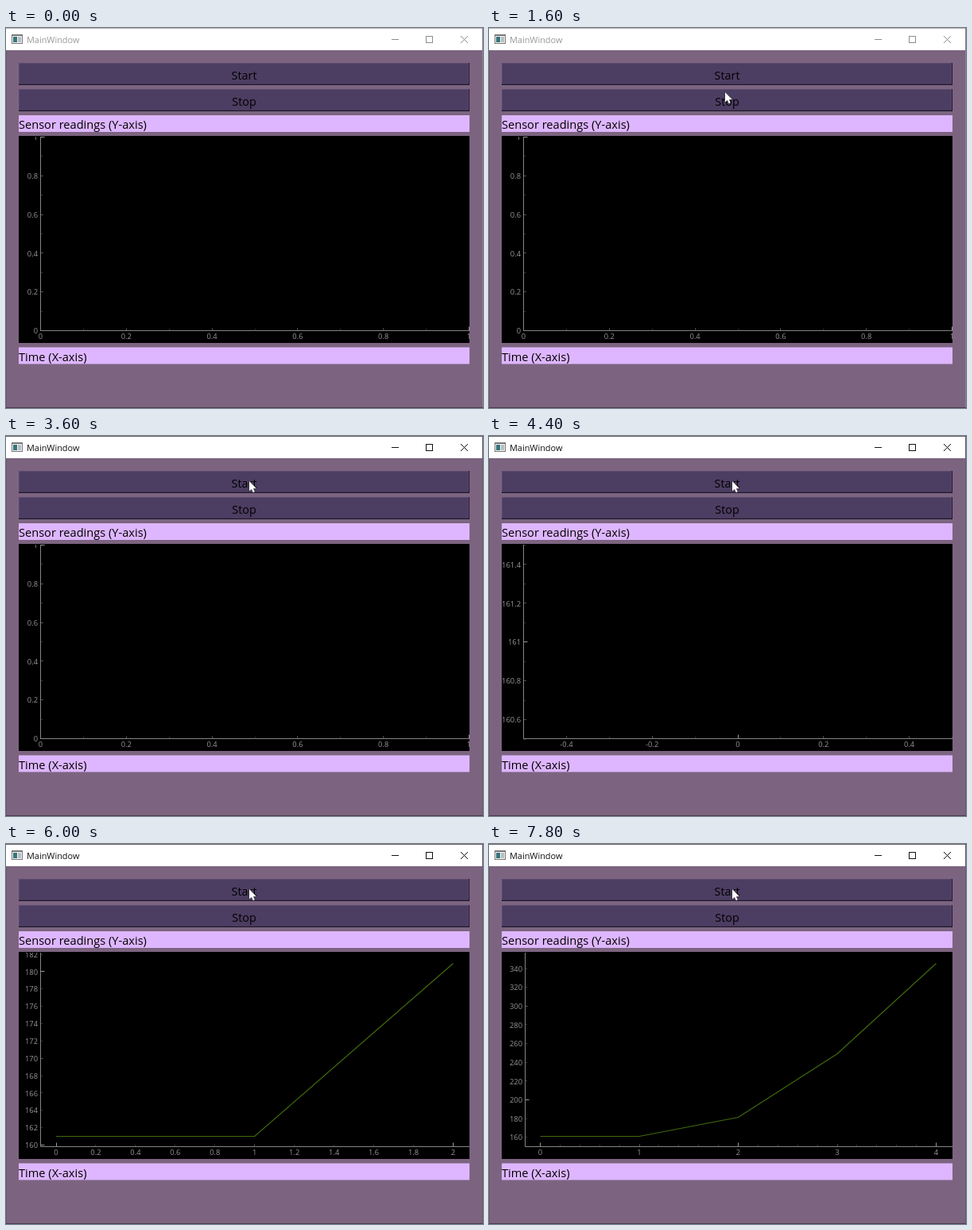
Recreate the animation shown at these times as an HTML page with a canvas. Size 600 px wide and 479 px high, loop 8 s.

```html
<!DOCTYPE html>
<html lang="en">
<head>
<meta charset="utf-8">
<title>MainWindow</title>
<style>
html, body { margin: 0; width: 100%; height: 100%; overflow: hidden; background: #7c6480; }
canvas { display: block; }
</style>
</head>
<body>
<canvas id="stage" width="600" height="479"></canvas>
<script>
const ctx = document.getElementById('stage').getContext('2d');
const LOOP = 8000, STEP = 200, ACTIVATED = 3400;
const FONT = '"Open Sans", "Noto Sans", sans-serif';
const LEFT = 16, RIGHT = 583;
const AXIS_Y = 381.5, PLOT_TOP = 137;

const readings = [161, 161, 181, 249, 346];
const arrivals = [3800, 4600, 5600, 6400, 7400];

// Per number of readings: axis position, two [value, pixel] anchors per axis,
// tick spacings from coarse to fine, and label spacing.
const views = [
  { axis: 43.5, x: [0, 43.5, 1, 582.5], y: [0, 381.5, 1, 137.5],
    xTicks: [1, .2, .1], yTicks: [1, .2, .1], xLabel: .2, yLabel: .2 },
  { axis: 43.5, x: [-.5, 43.5, .5, 582.5], y: [160.5, 382, 161.5, 137.5],
    xTicks: [1, .2, .1], yTicks: [1, .2, .1], xLabel: .2, yLabel: .2 },
  { axis: 43.5, x: [0, 63, 1, 562.5], y: [160.5, 382, 161.5, 137.5],
    xTicks: [1, .2, .1], yTicks: [1, .2, .1], xLabel: .2, yLabel: .2 },
  { axis: 43.5, x: [0, 63, 2, 562.5], y: [161, 368.5, 181, 150],
    xTicks: [2, 1, .2], yTicks: [20, 10, 2], xLabel: .2, yLabel: 2 },
  { axis: 45.5, x: [0, 64.5, 3, 562.5], y: [161, 368.5, 249, 150],
    xTicks: [2, 1, .2], yTicks: [100, 20, 10], xLabel: .2, yLabel: 10 },
  { axis: 45.5, x: [0, 64.5, 4, 562.5], y: [161, 368.5, 346, 150],
    xTicks: [2, 1, .2], yTicks: [200, 100, 20], xLabel: 1, yLabel: 20 }
];

// Cursor tip as [time, x, y]
const cursorPath = [[1000, 330, 300], [1600, 297, 81], [2000, 306, 57]];

function box(x, y, w, h, color) {
  ctx.fillStyle = color;
  ctx.fillRect(x, y, w, h);
}

function text(str, x, y, size, color, align = 'left', weight = 400) {
  ctx.font = `${weight} ${size}px ${FONT}`;
  ctx.fillStyle = color;
  ctx.textAlign = align;
  ctx.fillText(str, x, y);
}

function path(points, color, width = 1) {
  ctx.beginPath();
  points.forEach(([x, y]) => ctx.lineTo(x, y));
  ctx.strokeStyle = color;
  ctx.lineWidth = width;
  ctx.stroke();
}

const scale = ([v0, p0, v1, p1]) => v => p0 + (v - v0) * (p1 - p0) / (v1 - v0);
const unscale = ([v0, p0, v1, p1]) => p => v0 + (p - p0) * (v1 - v0) / (p1 - p0);

function multiples(step, lo, hi) {
  const list = [];
  for (let i = Math.ceil(lo / step - 1e-6); i <= hi / step + 1e-6; i++) list.push(i * step);
  return list;
}

function drawTitleBar(active) {
  const ink = active ? '#111' : '#8c8c8c';
  box(0, 0, 600, 28, '#fff');
  box(0, 0, 600, 1, active ? '#666' : '#b4b4b4');
  box(7, 8, 14, 12, '#777');
  box(8, 10, 12, 9, '#f4f4f4');
  box(9, 11, 5, 7, '#35757a');
  box(15, 11, 4, 7, '#b5bcc4');
  text('MainWindow', 26, 18.5, 10.9, active ? '#111' : '#999');
  path([[485, 14.5], [494, 14.5]], ink);
  ctx.strokeRect(528.5, 10.5, 8, 8);
  path([[572, 10], [581, 19]], ink);
  path([[581, 10], [572, 19]], ink);
}

function drawButton(label, y) {
  box(LEFT, y, RIGHT - LEFT, 28, '#1f172b');
  box(LEFT, y, RIGHT - LEFT - 1, 26.5, '#5b4a70');
  box(LEFT + 1, y + 1, RIGHT - LEFT - 3, 25.5, '#4c3d62');
  text(label, 299.5, y + 21, 14.4, '#000', 'center', 500);
}

function drawLabel(label, y, h) {
  box(LEFT, y, RIGHT - LEFT, h, '#deb6ff');
  text(label, LEFT, y + 17, 14.6, '#000', 'left', 500);
}

function drawPlot(count) {
  const view = views[count], { axis } = view;
  const toX = scale(view.x), toY = scale(view.y);
  const fromX = unscale(view.x), fromY = unscale(view.y);
  const xRange = [fromX(axis), fromX(582.5)];
  const yRange = [fromY(AXIS_Y + .5), fromY(PLOT_TOP)];
  const crisp = p => Math.floor(p) + .5;
  const format = v => String(Number(v.toFixed(1)));

  box(LEFT, 136, RIGHT - LEFT, 261, '#000');
  ctx.save();
  ctx.beginPath();
  ctx.rect(LEFT, PLOT_TOP, RIGHT - LEFT, 260);
  ctx.clip();

  [2, 1, 0].forEach(level => {
    const length = 5 / (1 + level / 2);
    const color = ['#999', '#505050', '#343434'][level];
    multiples(view.xTicks[level], ...xRange).forEach(v => {
      const x = crisp(toX(v));
      path([[x, AXIS_Y], [x, AXIS_Y - length]], color);
    });
    multiples(view.yTicks[level], ...yRange).forEach(v => {
      const y = crisp(toY(v));
      path([[axis, y], [axis + length, y]], color);
    });
  });
  path([[axis, PLOT_TOP], [axis, AXIS_Y], [RIGHT, AXIS_Y]], '#858585');

  multiples(view.xLabel, ...xRange).forEach(v =>
    text(format(v), toX(v), 391.5, 9.4, '#969696', 'center'));
  multiples(view.yLabel, ...yRange).forEach(v =>
    text(format(v), axis - 3.5, toY(v) + 3.7, 9.4, '#969696', 'right'));

  if (count > 1) {
    const points = readings.slice(0, count).map((v, i) => [toX(i), crisp(toY(v))]);
    path(points, count === 2 ? '#306a2a' : '#426a0c', count === 2 ? 1 : 1.2);
  }
  ctx.restore();
}

function drawCursor(t) {
  if (t < cursorPath[0][0]) return;
  let [, x, y] = cursorPath[cursorPath.length - 1];
  for (let i = 1; i < cursorPath.length; i++) {
    const [t0, x0, y0] = cursorPath[i - 1], [t1, x1, y1] = cursorPath[i];
    if (t < t1) {
      const p = (t - t0) / (t1 - t0), eased = 1 - (1 - p) ** 2;
      x = x0 + (x1 - x0) * eased;
      y = y0 + (y1 - y0) * eased;
      break;
    }
  }
  ctx.save();
  ctx.translate(x, y);
  ctx.beginPath();
  [[0, 0], [0, 12.5], [2.8, 10], [4.8, 14.2], [6.8, 13.3], [5, 9.2], [8.8, 9]]
    .forEach(([px, py]) => ctx.lineTo(px, py));
  ctx.closePath();
  ctx.strokeStyle = '#222';
  ctx.lineWidth = 1;
  ctx.stroke();
  ctx.fillStyle = '#fff';
  ctx.fill();
  ctx.restore();
}

function draw(t) {
  const active = t >= ACTIVATED;
  box(0, 0, 600, 479, '#7c6480');
  drawTitleBar(active);
  drawButton('Start', 44);
  drawButton('Stop', 77);
  drawLabel('Sensor readings (Y-axis)', 110, 21);
  drawPlot(arrivals.filter(a => t >= a).length);
  drawLabel('Time (X-axis)', 402.5, 21);
  box(0, 28, 1, 451, '#6a5a6d');
  box(599, 0, 1, 479, active ? '#6a5a6d' : '#8d7d90');
  box(0, 478, 600, 1, '#4a3c4d');
  drawCursor(t);
}

function tick() {
  const t = performance.now() % LOOP;
  draw(Math.floor(t / STEP) * STEP);
  requestAnimationFrame(tick);
}
tick();
</script>
</body>
</html>
```
